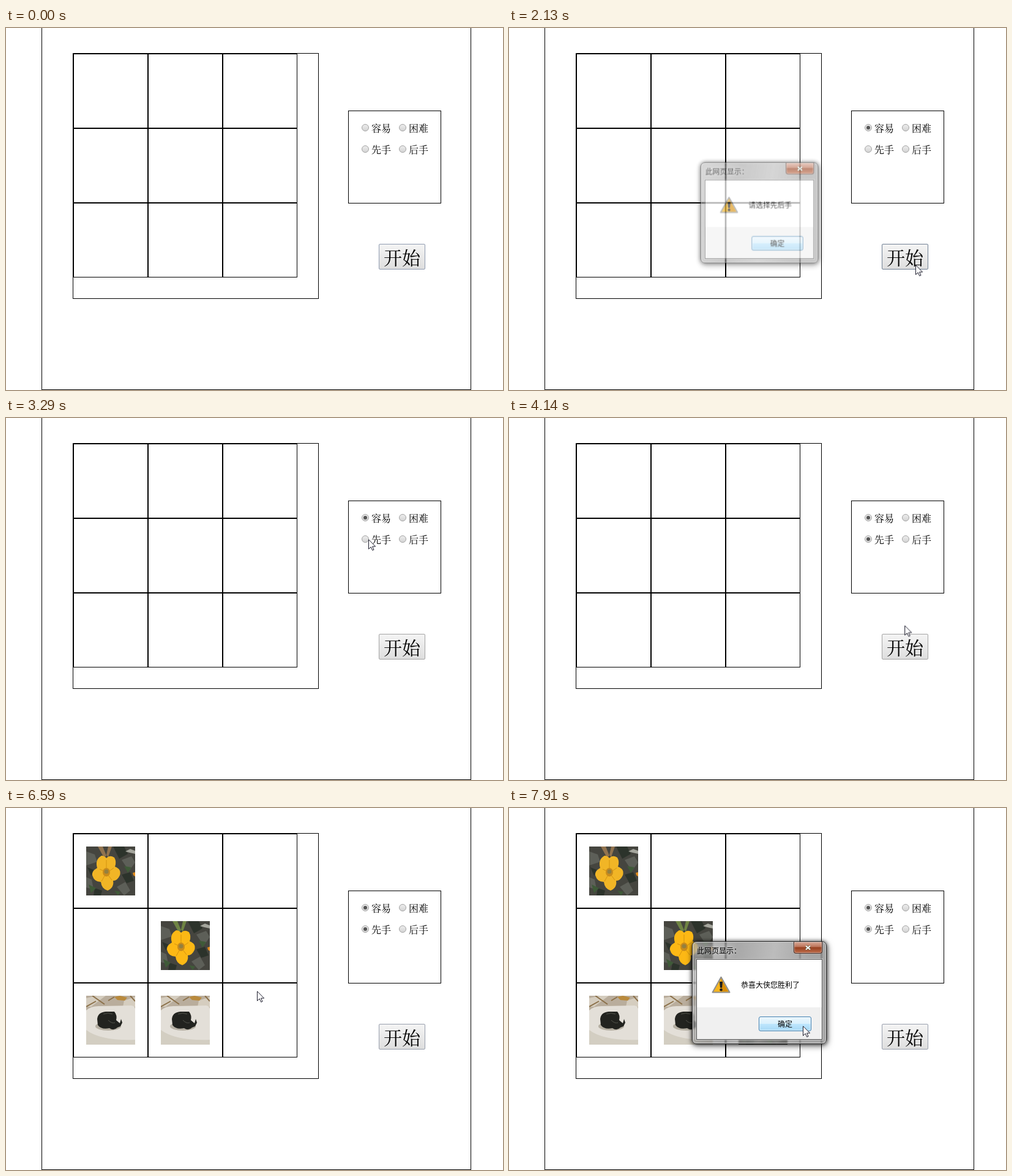
Animation, 812 px wide and 592 px high, one loop 8 s. Source, as an HTML page:

```html
<!DOCTYPE html>
<html lang="zh-CN">
<head>
<meta charset="utf-8">
<title>井字棋</title>
<style>
* { box-sizing: border-box; }
html, body { margin: 0; width: 100%; height: 100%; overflow: hidden; background: #fff; }
body { font: 300 16px/16px "Noto Serif CJK SC", "Noto Sans CJK SC", "Noto Sans CJK", sans-serif; color: #000; }
.stage { position: relative; width: 812px; height: 592px; overflow: hidden; }
.stage > *, .dialog > * { position: absolute; }
.page { left: 58px; top: -1px; width: 702px; height: 593px; border: 1px solid #000; }
.board { left: 109px; top: 41px; width: 402px; height: 402px; border: 1px solid #000; display: grid; grid: repeat(3, 122px) / repeat(3, 122px); }
.board div { border: 1px solid #000; padding: 20px; }
.board svg { display: block; width: 80px; height: 80px; }
.options { left: 559px; top: 135px; width: 152px; height: 152px; border: 1px solid #000; }

.radio { display: flex; gap: 4px; white-space: nowrap; }
.radio i { width: 12px; height: 12px; margin-top: 1px; border: 1px solid #a3a3a3; border-radius: 50%; background: linear-gradient(#ececec, #d4d4d4); }
.radio b { display: block; width: 6px; height: 6px; margin: 2px; border-radius: 50%; background: #555; }
.start { left: 609px; top: 353px; width: 76px; height: 42px; border: 1px solid; border-radius: 2px; font-size: 30px; line-height: 40px; text-align: center; white-space: nowrap; animation: start 8s step-end infinite; }

/* Things that pop in and stay */
.easy { animation: easy 8s step-end infinite; }
.first { animation: first 8s step-end infinite; }
.turn1 { animation: turn1 8s step-end infinite; }
.turn2 { animation: turn2 8s step-end infinite; }
.turn3 { animation: turn3 8s step-end infinite; }
@keyframes easy { 0% { opacity: 0; } 15.75% { opacity: 1; } }
@keyframes first { 0% { opacity: 0; } 44% { opacity: 1; } }
@keyframes turn1 { 0% { opacity: 0; } 66.625% { opacity: 1; } }
@keyframes turn2 { 0% { opacity: 0; } 77.375% { opacity: 1; } }
@keyframes turn3 { 0% { opacity: 0; } 92% { opacity: 1; } }

@keyframes start {
  0%, 100% { border-color: #8f9bb0; background: linear-gradient(#f4f4f4, #dedede); }
  18.5%, 52% { border-color: #777; background: linear-gradient(#f4f4f4, #dcdcdc); }
  23.25%, 55% { border-color: #777; background: linear-gradient(#e2e2e2, #d6d6d6); }
  25.5% { border-color: #6f7f93; background: linear-gradient(#f4f4f4, #dedede); }
  34.5% { border-color: #a3a3a3; background: linear-gradient(#f4f4f4, #dedede); }
  56% { border-color: #979eac; background: linear-gradient(#f4f4f4, #dedede); }
}

.dialog {
  top: 218px; height: 168px; border: 1px solid #2b2b2b; border-radius: 7px;
  font: 12px/14px "Noto Sans CJK SC", "Noto Sans CJK", sans-serif; white-space: nowrap;
  background: linear-gradient(100deg, #ffffff50, #ffffff10 30%, #ffffff48 55%, #ffffff08 80%), #6b6b6ba0;
  backdrop-filter: blur(1px);
  box-shadow: inset 0 0 0 1px #ffffff90, 0 0 6px #000000b0, 1px 3px 11px #00000090;
}
.warn { left: 311px; width: 196px; animation: warn 8s linear infinite; }
.win { left: 299px; width: 220px; animation: win 8s linear infinite; }
@keyframes warn {
  0%, 25.4% { opacity: 0; transform: scale(.95); }
  27.4%, 34.4% { opacity: 1; transform: none; }
  36%, 100% { opacity: 0; transform: scale(.95); }
}
@keyframes win {
  0%, 92.8% { opacity: 0; transform: scale(.95); }
  94.8%, 100% { opacity: 1; transform: none; }
}
.title { left: 7px; top: 7px; text-shadow: 0 0 6px #fff; }
.close { right: 6px; top: 0; width: 47px; height: 19px; border: 1px solid #4b2a20; border-top: 0; border-radius: 0 0 4px 4px; background: linear-gradient(#d8aa98, #bd7358 45%, #96401f 50%, #bd6a48); box-shadow: inset 0 0 0 1px #ffffff60; }
.close svg { display: block; margin: 5px auto 0; }
.pane { left: 6px; right: 6px; top: 28px; height: 132px; border: 1px solid #4c4c4c; background: linear-gradient(#fff 78px, #f0f0f0 78px); box-shadow: 0 0 0 1px #ffffff70; }
.icon { left: 31px; top: 56px; }
.text { left: 79px; top: 63px; }
.ok { right: 24px; top: 122px; width: 86px; height: 24px; border: 1px solid #3c7fb1; border-radius: 3px; line-height: 22px; text-align: center; background: linear-gradient(#eaf6fd, #d9f0fc 50%, #bee6fd 50%, #a7d9f5); box-shadow: inset 0 0 0 1px #ffffffa0; }

.cursor { left: 0; top: 0; animation: move 8s step-end infinite; }
@keyframes move {
  0% { transform: translate(743px, 534px); opacity: 0; }
  0.875% { transform: translate(743px, 534px); opacity: 1; animation-timing-function: steps(10); }
  10.75% { transform: translate(595px, 172px); }
  11.5% { transform: translate(595px, 172px); animation-timing-function: steps(2, jump-both); }
  13.625% { transform: translate(591px, 164px); }
  17.625% { transform: translate(591px, 164px); animation-timing-function: steps(2, jump-both); }
  19.5% { transform: translate(662px, 376px); animation-timing-function: steps(2); }
  21.375% { transform: translate(664px, 387px); }
  26.5% { transform: translate(664px, 387px); animation-timing-function: steps(6); }
  32.375% { transform: translate(462px, 357px); }
  35.5% { transform: translate(462px, 357px); animation-timing-function: steps(7); }
  41.125% { transform: translate(592px, 198px); }
  43% { transform: translate(591px, 198px); }
  44.875% { transform: translate(591px, 198px); animation-timing-function: steps(9, jump-both); }
  53.625% { transform: translate(660px, 374px); }
  56% { transform: translate(660px, 374px); animation-timing-function: steps(7, jump-both); }
  62.75% { transform: translate(181px, 121px); }
  67.625% { transform: translate(181px, 121px); animation-timing-function: steps(6, jump-both); }
  73.5% { transform: translate(312px, 231px); animation-timing-function: steps(2); }
  75.5% { transform: translate(303px, 239px); }
  80.25% { transform: translate(303px, 239px); animation-timing-function: steps(2, jump-both); }
  82.375% { transform: translate(410px, 299px); animation-timing-function: steps(4); }
  86.125% { transform: translate(418px, 333px); }
  88% { transform: translate(419px, 343px); }
  89.125% { transform: translate(420px, 352px); }
  94% { transform: translate(420px, 352px); animation-timing-function: steps(5, jump-both); }
  98.875%, 100% { transform: translate(480px, 356px); opacity: 1; }
}
</style>
</head>
<body>
<svg width="0" height="0" style="position:absolute">
  <symbol id="flower" viewBox="0 0 80 80">
    <path fill="#45453f" d="M0 0h80v80H0z"/>
    <path fill="#5d5f58" d="M0 8l14 5 4 12-18 6zM58 22l16-6 6 10-10 14zM50 66l14-8 8 14-10 8zM0 50l9 4 3 16-12-3z"/>
    <path fill="#2c332b" d="M44 0h18l6 12-14 8zM2 34l10 4-4 10zM58 46l14-4 6 14-12 4zM14 68l12 4-2 8H12z"/>
    <path fill="#3f5a38" d="M62 32l12 2-6 9zM4 62l12 6-8 8zM46 72l10 2-4 6z"/>
    <path fill="#a5a69d" d="M64 8l8-4 8 3v5l-9-2z"/>
    <path fill="var(--leaf)" d="M19 0h8l6 15-4 3zM36 0h6l-6 17-3-3z"/>
    <path fill="#e08b1c" d="M76 43l4-1v7l-3-2z"/>
    <path fill="var(--petal)" d="M33 19Q38 13 46 18 50 25 47 33 58 37 55 47 51 56 44 56 46 67 35 72 25 69 24 58 13 58 10 47 9 40 18 35 14 21 25 15 30 15 33 19z"/>
    <path fill="none" stroke="#d4930f" stroke-width="1" d="M33 22v14M22 37l7 3M45 35l-7 5M42 55l-6-8M25 57l5-9"/>
    <ellipse cx="33" cy="42" rx="6" ry="7" fill="#c88b1c"/>
    <circle cx="33" cy="41" r="3.5" fill="#94803f"/>
  </symbol>
  <symbol id="beetle" viewBox="0 0 80 80">
    <path fill="#b9ad9c" d="M0 0h80v80H0z"/>
    <path fill="#d5cdbf" d="M0 4l18-4h14L8 18H0zM62 8l18-6v16H60z"/>
    <path fill="none" stroke="#8b7049" stroke-width="2" d="M10 0l20 14M36 8l10-6M0 18l16-9M72 0l8 9"/>
    <path fill="#b98a3d" d="M46 2l9-2 12 3-4 5-12-1z"/>
    <path fill="#e3dfd8" d="M0 24Q8 16 24 17L74 16Q80 17 80 22V80H0z"/>
    <path fill="#d3cec2" d="M0 56Q24 74 80 72v8H0z"/>
    <ellipse cx="36" cy="50" rx="21" ry="7" fill="#b5afa2"/>
    <path fill="#22231f" d="M18 38Q19 27 32 26L46 26Q51 32 49 40L55 45 57 38 59 44 56 50 51 52Q45 58 38 53 25 56 19 48z"/>
    <path fill="none" stroke="#53554c" d="M28 30Q36 27 43 30M36 40Q42 46 47 44"/>
  </symbol>
  <symbol id="alert" viewBox="0 0 31 28">
    <path fill="#f6b51e" stroke="#8f8f8f" stroke-width="2" stroke-linejoin="round" d="M15.5 1.5L29.5 26.5H1.5z"/>
    <path fill="#d98d08" d="M15.5 4L27 25H15.5z"/>
    <path fill="#1d1d1d" d="M13 9h5l-1 10h-3z"/>
    <circle cx="15.5" cy="22.3" r="2.2" fill="#1d1d1d"/>
  </symbol>
  <symbol id="cross" viewBox="0 0 11 9">
    <path d="M2 1.5l7 6M9 1.5l-7 6" stroke="#553" stroke-width="3.6"/>
    <path d="M2 1.5l7 6M9 1.5l-7 6" stroke="#fff" stroke-width="2.2"/>
  </symbol>
</svg>

<div class="stage">
  <div class="page"></div>
  <div class="board">
    <div><svg class="turn1" style="--petal:#f1b526;--leaf:#92734e"><use href="#flower"/></svg></div>
    <div></div>
    <div></div>
    <div></div>
    <div><svg class="turn2" style="--petal:#fcb815;--leaf:#6f8444"><use href="#flower"/></svg></div>
    <div></div>
    <div><svg class="turn1"><use href="#beetle"/></svg></div>
    <div><svg class="turn2"><use href="#beetle"/></svg></div>
    <div><svg class="turn3" style="--petal:#fcb815;--leaf:#6f8444"><use href="#flower"/></svg></div>
  </div>

  <div class="options"></div>
  <div class="radio" style="left:581px;top:156px"><i><b class="easy"></b></i>容易</div>
  <div class="radio" style="left:642px;top:156px"><i></i>困难</div>
  <div class="radio" style="left:581px;top:191px"><i><b class="first"></b></i>先手</div>
  <div class="radio" style="left:642px;top:191px"><i></i>后手</div>
  <div class="start">开始</div>

  <div class="dialog warn">
    <div class="title">此网页显示：</div>
    <div class="close"><svg width="11" height="9"><use href="#cross"/></svg></div>
    <div class="pane"></div>
    <svg class="icon" width="31" height="28"><use href="#alert"/></svg>
    <div class="text">请选择先后手</div>
    <div class="ok">确定</div>
  </div>
  <div class="dialog win">
    <div class="title">此网页显示：</div>
    <div class="close"><svg width="11" height="9"><use href="#cross"/></svg></div>
    <div class="pane"></div>
    <svg class="icon" width="31" height="28"><use href="#alert"/></svg>
    <div class="text">恭喜大侠您胜利了</div>
    <div class="ok">确定</div>
  </div>

  <svg class="cursor" width="13" height="20">
    <path fill="#fff" stroke="#1c1c2c" d="M.5.8V16.3L4.2 12.9 6.7 18.4 9 17.4 6.6 12.1H11.6z"/>
  </svg>
</div>
</body>
</html>
```
